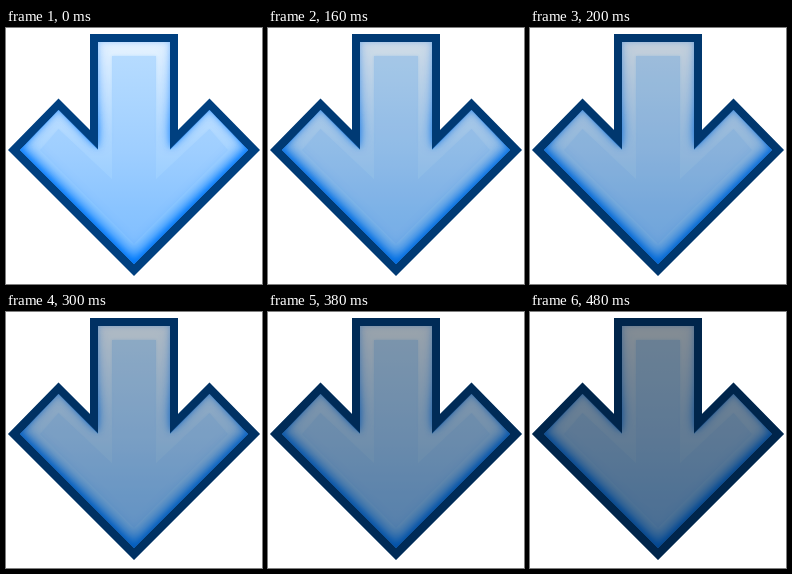
Recreate the animation shown at these times as an HTML page with a canvas. Size 256x256 px, loop 880 ms.

```html
<!DOCTYPE html>
<html lang="en">
<head>
<meta charset="utf-8">
<title>Pulsing arrow</title>
<style>
  html, body { margin: 0; width: 100%; height: 100%; overflow: hidden; background: #fff; }
  canvas { display: block; width: 256px; height: 256px; }
</style>
</head>
<body>
<canvas id="stage" width="256" height="256"></canvas>
<script>
const SIZE = 256;
const CENTER = SIZE / 2;
const LOOP = 880;
const STEP_TIMES = [120, 160, 200, 260, 300, 340, 380, 420, 480];
const MAX_SHADE = 0.42;

// A symmetric downward arrow; widths are measured from the centre line.
function arrowPath(stem, top, notch, peak, wing, tip) {
  const half = [[stem, top], [stem, notch], [75.5, peak], [wing, 122], [0, tip]];
  const mirrored = half.map(([x, y]) => [-x, y]).reverse();
  const path = new Path2D();
  [...half, ...mirrored].forEach(([x, y]) => path.lineTo(CENTER + x, y));
  path.closePath();
  return path;
}

const outer = arrowPath(44, 6, 102, 70.5, 126, 248);
const inner = arrowPath(36, 14, 121.5, 82, 114, 236);
const panel = arrowPath(22, 28, 151, 101, 94, 216);

function makeLayer() {
  const layer = document.createElement("canvas");
  layer.width = layer.height = SIZE;
  return layer.getContext("2d");
}

function verticalGradient(ctx, ...colors) {
  const gradient = ctx.createLinearGradient(0, 14, 0, 236);
  colors.forEach((color, i) => gradient.addColorStop(i / (colors.length - 1), color));
  return gradient;
}

// Blurred surroundings of the inner shape, tinted from top to bottom.
function makeGlow(blur, lift, ...colors) {
  const ctx = makeLayer();
  const frame = new Path2D();
  frame.rect(-60, -60, SIZE + 120, SIZE + 120);
  frame.addPath(inner);
  ctx.shadowColor = "#000";
  ctx.shadowBlur = blur;
  ctx.shadowOffsetY = -lift;
  ctx.fill(frame, "evenodd");

  ctx.shadowColor = "transparent";
  ctx.globalCompositeOperation = "source-in";
  ctx.fillStyle = verticalGradient(ctx, ...colors);
  ctx.fillRect(0, 0, SIZE, SIZE);
  return ctx.canvas;
}

function makeArrow() {
  const ctx = makeLayer();
  ctx.fillStyle = "#004080";
  ctx.fill(outer);

  ctx.clip(inner);
  ctx.fillStyle = verticalGradient(ctx, "#e6f3ff", "#c6e3ff", "#a8d4ff", "#8ec8ff", "#80c0ff");
  ctx.fillRect(0, 0, SIZE, SIZE);

  ctx.shadowColor = "rgba(160,210,255,0.6)";
  ctx.shadowBlur = 3;
  ctx.fillStyle = verticalGradient(ctx, "#b9ddff", "#acd6ff", "#9eceff", "#8ac4ff", "#7cbcff");
  ctx.fill(panel);
  ctx.shadowColor = "transparent";

  ctx.drawImage(makeGlow(14, 6,
    "rgba(70,160,255,0.2)", "rgba(40,145,255,0.4)", "rgba(0,124,255,0.95)", "#007cff", "#007cff"), 0, 0);
  ctx.drawImage(makeGlow(6, 1,
    "rgba(60,150,255,0.5)", "rgba(40,140,255,0.6)", "rgba(0,120,255,0.85)", "#0074f4", "#0074f4"), 0, 0);
  return ctx.canvas;
}

const ctx = document.getElementById("stage").getContext("2d");
const arrow = makeArrow();

function draw(now) {
  const time = now % LOOP;
  const step = STEP_TIMES.filter(t => t <= time).length;
  ctx.fillStyle = "#fff";
  ctx.fillRect(0, 0, SIZE, SIZE);
  ctx.drawImage(arrow, 0, 0);
  ctx.fillStyle = `rgba(0,0,0,${MAX_SHADE * step / STEP_TIMES.length})`;
  ctx.fill(outer);
}

let start;
function tick(now) {
  start ??= now;
  draw(now - start);
  requestAnimationFrame(tick);
}
draw(0);
requestAnimationFrame(tick);
</script>
</body>
</html>
```
